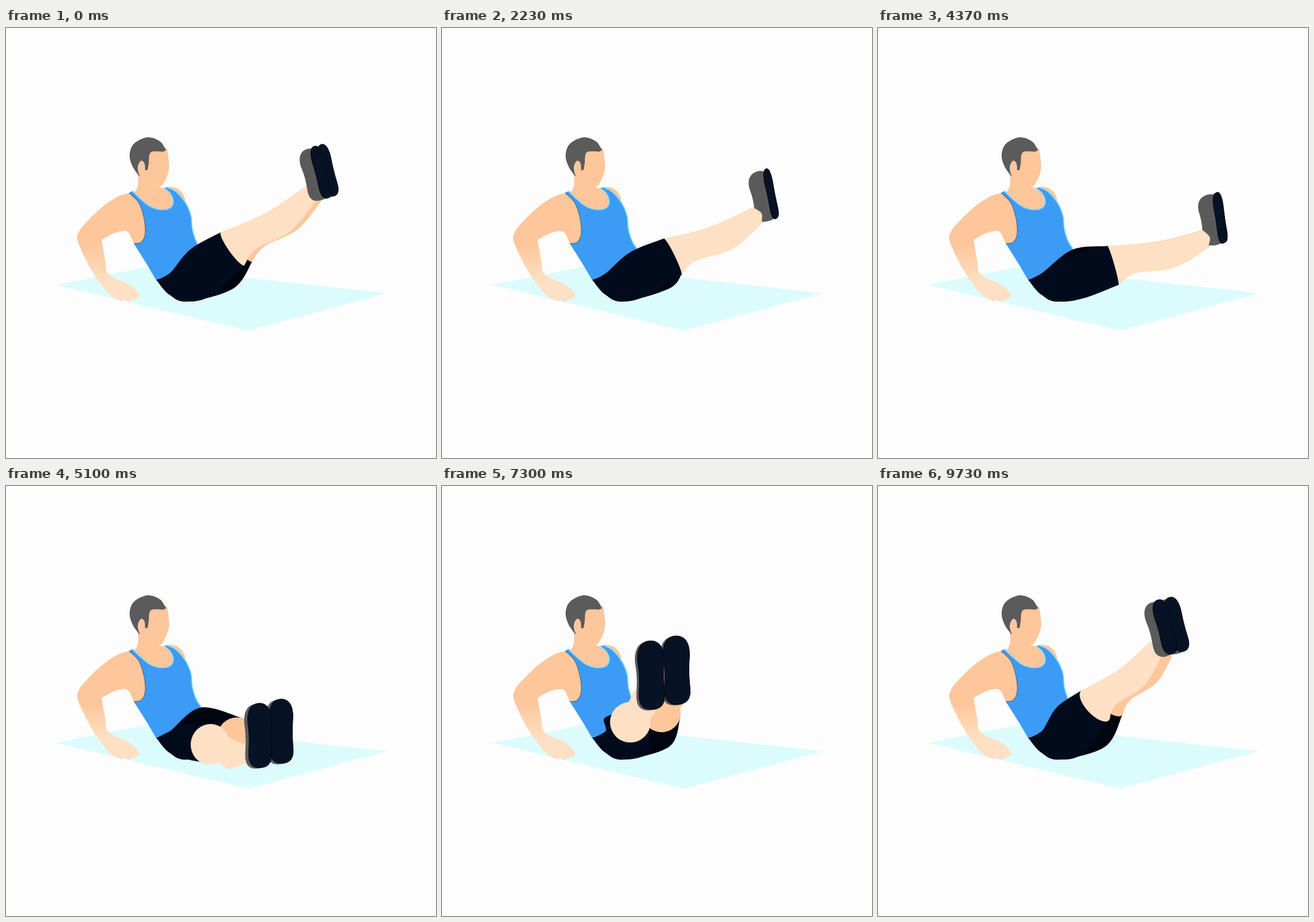
An HTML page with a canvas that plays this animation: 720 px wide and 720 px high, repeating every 9.76 s.

```html
<!DOCTYPE html>
<html lang="en">
<head>
<meta charset="utf-8">
<title>Leg circles</title>
<style>
  html, body { margin: 0; width: 100%; height: 100%; overflow: hidden; background: #fdfdfd; }
  canvas { display: block; width: 720px; height: 720px; }
</style>
</head>
<body>
<canvas id="stage" width="720" height="720"></canvas>
<script>
const ctx = document.getElementById('stage').getContext('2d');
const LOOP = 9760, CYCLE = 1970;
const color = {
  paper: '#fdfdfd', mat: '#dcfbfd', skin: '#fdc69b', pale: '#fee0c4', hair: '#5b5b5b',
  tank: '#3c9bf4', trim: '#86dcff', shorts: '#020b1c', farShorts: '#01050f',
  shoe: '#5b5a5b', sole: '#071325', seam: '#02060e'
};

// Path of the near foot: time, sole centre, and how far the sole faces the viewer.
const footPath = [
  { t: 0, at: [527, 241, 10] }, { t: 260, at: [550, 278, 6] },
  { t: 575, at: [583, 355, 8] }, { t: 890, at: [560, 427, 12.5] },
  { t: 1160, at: [425, 418, 19.5] }, { t: 1390, at: [350, 317, 22] },
  { t: 1660, at: [417, 256, 17] }, { t: 1850, at: [480, 236, 13] }
];
const HIP = [304, 423];

const add = (p, q) => [p[0] + q[0], p[1] + q[1]];
const mix = (p, q, k) => [p[0] + (q[0] - p[0]) * k, p[1] + (q[1] - p[1]) * k];
const clamp = (v, low, high) => Math.min(high, Math.max(low, v));

// Smooth closed curve through the foot path.
function footAt(t) {
  const n = footPath.length;
  const key = k => footPath[(k + n) % n];
  const time = k => key(k).t + CYCLE * Math.floor(k / n);
  let i = n - 1;
  while (footPath[i].t > t) i--;
  const span = time(i + 1) - time(i);
  const u = (t - time(i)) / span, u2 = u * u, u3 = u2 * u;
  return [0, 1, 2].map(axis => {
    const value = k => key(k).at[axis];
    const slope = k => (value(k + 1) - value(k - 1)) / (time(k + 1) - time(k - 1)) * span;
    return (2 * u3 - 3 * u2 + 1) * value(i) + (u3 - 2 * u2 + u) * slope(i)
      + (3 * u2 - 2 * u3) * value(i + 1) + (u3 - u2) * slope(i + 1);
  });
}

// Each run is a smooth curve through its points; runs meet in corners.
function shape(...runs) {
  const path = new Path2D();
  runs.forEach((points, index) => {
    if (index) path.lineTo(...points[0]); else path.moveTo(...points[0]);
    for (let i = 0; i < points.length - 1; i++) {
      const p = points[i], q = points[i + 1];
      const before = points[i - 1] || p, after = points[i + 2] || q;
      path.bezierCurveTo(
        p[0] + (q[0] - before[0]) / 6, p[1] + (q[1] - before[1]) / 6,
        q[0] - (after[0] - p[0]) / 6, q[1] - (after[1] - p[1]) / 6, ...q);
    }
  });
  return path;
}

function fill(path, style) {
  ctx.fillStyle = style;
  ctx.fill(path);
}

function stroke(path, style, width) {
  ctx.strokeStyle = style;
  ctx.lineWidth = width;
  ctx.stroke(path);
}

const mat = shape([[84,430],[236,400]], [[638,444],[406,507]]);
const farShoulder = shape([[262,268],[276,266],[289,270],[298,281],[299,294],[285,300]]);
const head = shape(
  [[222,225],[238,204],[268,200]],
  [[270,203],[273,236],[262,263],[255,263]],
  [[258,266],[281,284],[276,306],[245,310],[212,276]],
  [[216,274],[221,263],[221,244]]);
const hair = shape(
  [[223,248],[212,232],[207,213],[214,194],[237,183],[258,190],[268,205]],
  [[263,207],[245,207],[240,213],[239,226],[237,238]],
  [[233,238],[232,227],[227,222],[222,228],[221,238],[224,248]]);
const arm = shape(
  [[207,277],[190,281],[162,299],[132,328],[121,344],[121,360],[144,407],[173,446],[194,458]],
  [[198,455],[206,459],[211,455],[217,454],[223,447],[207,430],[172,413],[166,388],[160,355]],
  [[160,355],[180,344],[197,340],[206,344],[214,361]],
  [[240,362],[240,300]]);
const neckline = [[212,273],[223,284],[240,298],[259,304],[275,301],[280,290],[275,277],[265,268]];
const front = [[271,267],[286,275],[302,295],[310,315],[312,336],[319,358],[331,376]];
const armhole = [[214,361],[226,359],[233,345],[231,318],[222,292],[206,276]];
const tank = shape(neckline, front, [[310,412],[252,423]], [[252,423],[233,391],[214,361]], armhole);
const edges = { neck: shape(neckline), front: shape(front), arm: shape(armhole) };

const armTone = ctx.createLinearGradient(0, 362, 0, 425);
armTone.addColorStop(0, color.skin);
armTone.addColorStop(1, color.pale);

function drawBody() {
  fill(farShoulder, color.skin);
  fill(head, color.skin);
  fill(hair, color.hair);
  fill(arm, armTone);
  fill(tank, color.tank);
  stroke(edges.neck, color.trim, 1.8);
  stroke(edges.front, color.trim, 1.8);
  stroke(edges.arm, '#526a80', 1.2);
}

function shoeAt(x, y, facing) {
  const tilt = (y - 430) / 190 * 14 * clamp((x - 330) / 150, 0, 1) * Math.PI / 180;
  const upper = 18 - facing * 0.62;
  const heel = [-(upper * 1.3 + 10), 31];
  const sin = Math.sin(tilt), cos = Math.cos(tilt);
  const ankle = [x + heel[0] * cos - heel[1] * sin, y + heel[0] * sin + heel[1] * cos];
  return { x, y, tilt, upper, ankle, width: facing, length: 41 + facing * facing * 0.034 };
}

// The hem is a ring around a straight leg; its depth follows the leg's turn to the viewer.
function legAt(hip, ankle, facing, radius) {
  const hem = mix(hip, ankle, 0.366);
  const dx = ankle[0] - hem[0], dy = ankle[1] - hem[1], length = Math.hypot(dx, dy);
  const point = (along, up) => [
    hem[0] + dx * along + dy / length * up,
    hem[1] + dy * along - dx / length * up
  ];
  return {
    hem, point, radius, ankle, angle: Math.atan2(dy, dx),
    depth: Math.min(radius, 2.7 * (facing - 7.5)),
    top: point(0, radius), low: point(0, -radius)
  };
}

function drawShorts(leg, waist, seat, style) {
  const bottom = [305, 458];
  fill(shape([[252,422],[274,411],waist,leg.top], [leg.low, seat, bottom, [273,446], [252,422]]), style);
}

function drawLeg(leg, skin, cloth) {
  const { point, hem, radius, depth, angle } = leg;
  const heel = point(1, -15), instep = point(1, 15);
  fill(shape(
    [leg.low, point(0.2, -23), point(0.6, -32), heel],
    [heel, add(mix(heel, instep, 0.5), [Math.cos(angle) * 8, Math.sin(angle) * 8]), instep],
    [instep, point(0.5, 17), leg.top]), skin);
  const ring = new Path2D();
  ring.ellipse(...hem, Math.abs(depth), radius, angle, 0, Math.PI * 2);
  fill(ring, depth < 0 ? cloth : skin);
}

// A shoe print: broad toe, slight waist, rounded heel.
function print(w, h) {
  const path = new Path2D();
  path.moveTo(0, -h);
  path.bezierCurveTo(w * 0.75, -h, w * 1.05, -h * 0.75, w, -h * 0.4);
  path.bezierCurveTo(w * 0.9, 0, w * 0.93, h * 0.2, w, h * 0.55);
  path.bezierCurveTo(w * 1.05, h * 0.85, w * 0.7, h, 0, h);
  path.bezierCurveTo(-w * 0.7, h, -w, h * 0.85, -w * 0.94, h * 0.5);
  path.bezierCurveTo(-w * 0.88, h * 0.2, -w * 0.85, 0, -w, -h * 0.4);
  path.bezierCurveTo(-w * 1.05, -h * 0.75, -w * 0.75, -h, 0, -h);
  return path;
}

function drawShoe(shoe) {
  ctx.save();
  ctx.translate(shoe.x, shoe.y);
  ctx.rotate(shoe.tilt);
  ctx.save();
  ctx.translate(-shoe.upper, 1.5);
  fill(print(Math.max(shoe.width, 18.5), shoe.length), color.shoe);
  ctx.restore();
  const sole = print(shoe.width, shoe.length);
  fill(sole, color.sole);
  stroke(sole, color.seam, 1);
  ctx.restore();
}

function drawLegs(t) {
  const [x, y, facing] = footAt(t);
  const gap = 2.6 * (facing - 5.5);
  const nearShoe = shoeAt(x, y, facing);
  const farShoe = { ...nearShoe, x: x + gap, y: y - gap * 0.17 - 1 };
  const farAnkle = add(nearShoe.ankle, [gap, -gap * 0.17 - 1]);
  const near = legAt(HIP, nearShoe.ankle, facing, 34);
  const far = legAt(add(HIP, [gap * 1.35, -gap * 0.45]), farAnkle, facing, 32);

  drawShorts(far, [326, 371], [381, 436], color.farShorts);
  drawLeg(far, color.skin, color.farShorts);
  drawShoe(farShoe);

  const waist = add(mix([274, 411], near.top, 0.5), [-8, -6]);
  const seat = [345, 447 + Math.max(0, near.low[1] - 415) * 0.35];
  drawShorts(near, waist, seat, color.shorts);

  // Seen from the side, the ankle sits in front of the shoe.
  const parts = [() => drawLeg(near, color.pale, color.shorts), () => drawShoe(nearShoe)];
  if (facing < 8.5) parts.reverse();
  parts.forEach(draw => draw());
}

function frame() {
  const t = performance.now() % LOOP;
  ctx.fillStyle = color.paper;
  ctx.fillRect(0, 0, 720, 720);
  fill(mat, color.mat);
  drawBody();
  drawLegs(t % CYCLE);
  requestAnimationFrame(frame);
}
frame();
</script>
</body>
</html>
```
